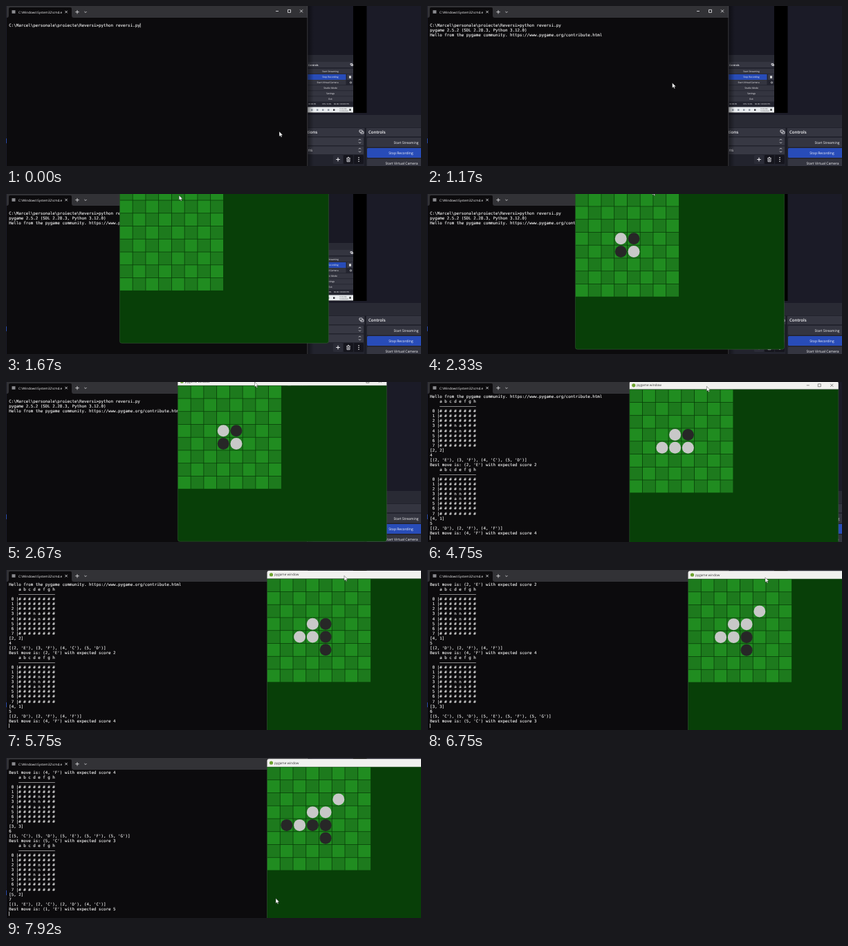
An HTML page for the animation above (8000 ms loop, 600x232 px).

```html
<!DOCTYPE html>
<html lang="en">
<head>
<meta charset="utf-8">
<title>Reversi session</title>
<style>
  html, body { margin: 0; width: 100%; height: 100%; overflow: hidden; background: #000; }
  svg { display: block; width: 600px; height: 232px; }
  text { white-space: pre; text-rendering: geometricPrecision; }
  .ui { font-family: "Open Sans", "Noto Sans", sans-serif; fill: #fafafc; }
  .mono { font-family: "DejaVu Sans Mono", monospace; font-size: 5.83px; fill: #f2f2f2; stroke: #f2f2f2; stroke-width: .12; }
  .mid { text-anchor: middle; }
  .line { fill: none; stroke: #ececf0; stroke-width: .8; }
</style>
</head>
<body>
<svg viewBox="0 0 600 232" xmlns="http://www.w3.org/2000/svg">
  <defs>
    <linearGradient id="shade">
      <stop offset="0" stop-color="#000" stop-opacity=".45"/>
      <stop offset="1" stop-color="#000" stop-opacity="0"/>
    </linearGradient>
  </defs>
  <g id="recorder"></g>
  <g id="terminal"></g>
  <g id="game"></g>
  <path id="pointer" d="M0 0V7.2L1.7 5.7L2.8 8.2L4 7.7L2.9 5.3H5.2Z" fill="#fff" stroke="#222" stroke-width=".4"/>
</svg>
<script>
const LOOP = 8000, CELL = 18.75, ROW = 7.06, ROWS = 30, CHAR = 3.51;
const el = id => document.getElementById(id);
const rect = (x, y, w, h, fill, extra = '') =>
  `<rect x="${x}" y="${y}" width="${w}" height="${h}" fill="${fill}" ${extra}/>`;
const label = (x, y, size, str, cls = '', extra = '') =>
  `<text class="ui ${cls}" x="${x}" y="${y}" font-size="${size}" ${extra}>${str}</text>`;
const stroke = (d, extra = '') => `<path class="line" d="${d}" ${extra}/>`;
const popout = (x, y, s) =>
  stroke(`M${x} ${y}h${4 * s}v${3 * s}h${-4 * s}zM${x + 2 * s} ${y + 3 * s}v${2 * s}h${4 * s}v${-3 * s}h${-2 * s}`);

function recorder() {
  // live preview of the same screen
  let s = rect(0, 0, 600, 232, '#1b1b27') + rect(0, 192, 1, 7, '#2a4cae')
    + rect(436, 0, 85.5, 155, '#000') + rect(436, 0, 66, 147, '#191924')
    + rect(436, 71, 66, 10, '#292a34')
    + rect(436, 81, 66, 8, '#343540') + label(437, 86.6, 3.6, 'Controls', '', 'font-weight="600"')
    + popout(498, 83.5, .6)
    + rect(436, 89, 66, 58, '#23242f') + rect(436, 99, 55.5, 8, '#284cb8')
    + rect(493, 99, 8.5, 8, '#3a3b48') + rect(496, 101.3, 3, 3.5, '#ddd')
    + '<circle cx="498.5" cy="111" r="1.2" fill="none" stroke="#ddd" stroke-width=".7"/>';
  ['Start Streaming', 'Stop Recording', 'Start Virtual Camera', 'Studio Mode', 'Settings', 'Exit']
    .forEach((name, i) => {
      if (i !== 1) s += rect(436, 91 + i * 8.05, i === 2 ? 55.5 : 66, 7.2, '#343540');
      s += label(i === 2 ? 465 : 469, 95.6 + i * 8.05, 3.3, name, 'mid');
    });
  s += label(437, 143.2, 2.8, '00:00:05') + label(457, 143.2, 2.8, 'CPU: 0.3%')
    + label(474, 143.2, 2.8, '60.00 / 60.00 FPS')
    + rect(436, 146.5, 66, 8, '#e9ecef');
  [441, 449, 457, 465, 473].forEach((x, i) =>
    s += rect(x, 149.5, 2.4, 2.4, i === 4 ? '#303038' : '#8a93a0'));
  s += label(482, 150.4, 2.4, '10:35 AM', '', 'style="fill:#333"')
    + label(482, 153.4, 2.4, '10/30/2024', '', 'style="fill:#333"')
    + rect(496.5, 149, 2, 3, '#333');

  // docks under the preview
  s += rect(436, 158, 164, 74, '#292a34') + rect(436, 176.5, 164, 1, '#1a1b24')
    + rect(436, 177, 83, 12, '#343540') + rect(521, 177, 79, 12, '#343540')
    + rect(436, 189, 83, 43, '#22232d') + rect(521, 189, 79, 43, '#22232d')
    + rect(518.5, 177, 2, 55, '#191a23')
    + label(430, 185.4, 6.1, 'ditions', '', 'font-weight="600"') + popout(511, 180, 1)
    + label(524, 185.4, 6.1, 'Controls', '', 'font-weight="600"')
    + rect(430, 190.5, 87, 11.5, '#373843', 'rx="1"') + rect(430, 203.5, 87, 11.5, '#373843', 'rx="1"')
    + label(436.5, 211.4, 6, 'ns');
  [196, 209].forEach(y => s += stroke(`M510 ${y - 1.5}l1.5-1.5l1.5 1.5M510 ${y + 1.5}l1.5 1.5l1.5-1.5`));
  [473, 488, 503].forEach((x, i) => s += rect(x, 216, 14, 13, i ? '#15151d' : '#2b2c37', 'rx="1.5"'));
  s += stroke('M480 219.7v5.6M477.2 222.5h5.6', 'style="stroke-width:1.1"')
    + stroke('M492.3 220.5h5.4M493 221v4.7h4v-4.7M494 219.3h2M494.3 222v2.6M495.7 222v2.6');
  [219.7, 222.5, 225.3].forEach(y => s += `<circle cx="510" cy="${y}" r=".8" fill="#eee"/>`);
  return s + rect(522, 191, 90, 13.5, '#343540', 'rx="1.5"')
    + rect(522, 206, 90, 14, '#284cb8', 'rx="1.5"')
    + rect(522, 221.5, 90, 13, '#343540', 'rx="1.5"')
    + label(578.5, 200, 5, 'Start Streaming', 'mid')
    + label(571, 215.2, 5, 'Stop Recording', 'mid')
    + label(572, 230.2, 5, 'Start Virtual Camera', 'mid');
}

function terminal() {
  let s = rect(436, 0, 9, 232, 'url(#shade)')
    + rect(1, 0, 435, 232, '#0c0b0d') + rect(1, 0, 435, 17, '#323236')
    + '<path d="M1 17Q4 17 4 14V4Q4 2 6 2H93Q95 2 95 4V14Q95 17 98 17Z" fill="#0c0b0d"/>'
    + rect(8.5, 6.2, 5, 4.6, '#8b8b8f')
    + label(18, 10.5, 4.65, 'C:\\Windows\\System32\\cmd.e', '', 'font-weight="500"')
    + stroke('M85.4 6.9l3.4 3.4m0-3.4l-3.4 3.4M103 6v5.4M100.3 8.7h5.4'
      + 'M113.4 8l1.6 1.6l1.6-1.6M390 7.5h4M407.5 5.4h4v4h-4zM425 5.4l4 4m0-4l-4 4')
    + rect(435.5, 0, .7, 232, '#4a4a50');
  for (let i = 0; i < ROWS; i++) s += `<text class="mono" x="4.2" y="${23.1 + i * ROW}"></text>`;
  return s + '<rect id="caret" width=".8" height="6.4" fill="#ddd"/>';
}

function game() {
  let s = '<path d="M0 0V-8.7Q0-11.7 3-11.7H299Q302-11.7 302-8.7V0Z" fill="#f1f1ef"/>'
    + '<circle cx="6" cy="-6" r="2.6" fill="#6da32f"/>'
    + label(10.5, -4.4, 4.7, 'pygame window', '', 'style="fill:#333"')
    + '<path d="M256-6h4M272.5-8h4v4h-4zM290.5-8l4 4m0-4l-4 4" fill="none" stroke="#444" stroke-width=".6"/>'
    + '<path d="M0 0H302V223Q302 226 299 226H3Q0 226 0 223Z" fill="#083f08" stroke="#3c5f3c" stroke-width=".5"/>';
  for (let i = 0; i < 64; i++) {
    const c = i % 8, r = i >> 3;
    s += rect(c * CELL + .4, r * CELL + .4, CELL - .8, CELL - .8, (c + r) % 2 ? '#208c20' : '#1d7a1d');
  }
  return s + '<g id="discs"></g>';
}

// boards: n or a, then row and column
const boards = [
  'n33 a34 a43 n44',
  'n24 n33 n34 a43 n44',
  'n24 n33 n34 a43 a44 a45',
  'n24 n33 n34 n43 a44 a45 n52'
];

function report(board, last, moveNo, moves, best, score) {
  const at = {};
  board.split(' ').forEach(p => at[p.slice(1)] = p[0]);
  const rows = [...Array(8).keys()].map(r =>
    ` ${r} |` + [...Array(8).keys()].map(c => at[`${r}${c}`] || '#').join(' '));
  const name = m => `(${m[0]}, '${m[1]}')`;
  return ['    a b c d e f g h', '    ' + '–'.repeat(15), ...rows, `[${last}]`, `${moveNo}`,
    `[${moves.split(' ').map(name).join(', ')}]`,
    `Best move is: ${name(best)} with expected score ${score}`];
}

const prompt = 'C:\\Marcel\\personale\\proiecte\\Reversi>python reversi.py';
const log = ['', prompt, 'pygame 2.5.2 (SDL 2.28.3, Python 3.12.0)',
  'Hello from the pygame community. https://www.pygame.org/contribute.html',
  ...report(boards[0], '2, 2', 4, '2E 3F 4C 5D', '2E', 2),
  ...report(boards[1], '4, 1', 5, '2D 2F 4F', '4F', 4),
  ...report(boards[2], '3, 3', 6, '5C 5D 5E 5F 5G', '5C', 3),
  ...report(boards[3], '5, 2', 7, '1E 2C 2D 4C', '1E', 5)];

// [time, value] steps
const printed = [[0, 2], [1080, 4], [3830, 17], [4080, 18], [4330, 31], [4580, 32],
  [6080, 45], [6500, 46], [6920, 59], [7420, 60]];
const position = [[0, ''], [1880, boards[0]], [4170, boards[1]], [5170, boards[2]],
  [6580, boards[3]], [7750, 'n24 n33 a34 n43 a44 a45 n52 a14']];
// [time, x, y] keys
const windowPath = [[1830, 164.4, -9.7], [2670, 248.3, 5.2], [3050, 276, 9.3], [3420, 292.8, 10.8],
  [5170, 292.8, 10.8], [5420, 340, 11.8], [5700, 377.5, 12.7], [6200, 377.5, 13]];
const pointerPath = [[0, 395, 182], [80, 395, 182], [420, 396, 171], [580, 396, 171], [830, 388, 150],
  [1000, 388, 150], [1400, 310, 60], [1670, 250, 2], [1830, 276, -14], [2670, 359.5, 0],
  [3050, 388, 4.8], [3420, 404.4, 6.3], [5170, 404.4, 6.3], [5420, 452, 7.2], [5700, 489, 8.2],
  [6830, 489, 11], [7400, 524, 10], [7670, 524, 10], [7920, 390, 203.5]];

const step = (steps, t) => steps.filter(s => s[0] <= t).pop()[1];
function along(path, t) {
  const i = path.findIndex(k => k[0] > t);
  if (i < 1) return (i ? path[path.length - 1] : path[0]).slice(1);
  const a = path[i - 1], b = path[i], k = (t - a[0]) / (b[0] - a[0]);
  return [a[1] + (b[1] - a[1]) * k, a[2] + (b[2] - a[2]) * k];
}
const move = (node, [x, y]) => node.setAttribute('transform', `translate(${x} ${y})`);

el('recorder').innerHTML = recorder();
el('terminal').innerHTML = terminal();
el('game').innerHTML = game();
const lines = [...document.querySelectorAll('.mono')];
const caret = el('caret');
let shownLines, shownBoard;

function showLog(n) {
  if (n === shownLines) return;
  shownLines = n;
  const top = Math.max(0, n + 1 - ROWS), view = log.slice(top, n);
  lines.forEach((node, i) => node.textContent = view[i] || '');
  const typing = n === 2;
  caret.setAttribute('x', typing ? 4.2 + prompt.length * CHAR : 4.2);
  caret.setAttribute('y', 17.8 + (typing ? 1 : n - top) * ROW);
}

function showBoard(board) {
  if (board === shownBoard) return;
  shownBoard = board;
  el('discs').innerHTML = board.split(' ').filter(Boolean).map(([side, c, r]) =>
    `<circle cx="${(+c + .5) * CELL + .2}" cy="${(+r + .5) * CELL}" r="8.5" fill="${side === 'n' ? '#c8c8c8' : '#272727'}"/>`
  ).join('');
}

function draw(t) {
  showLog(step(printed, t));
  showBoard(step(position, t));
  caret.style.display = (t < 580 || t >= 830 && t < 1080 || t >= 3830) ? '' : 'none';
  el('game').style.display = t < 1250 ? 'none' : '';
  move(el('game'), along(windowPath, t));
  move(el('pointer'), along(pointerPath, t));
}

function tick() {
  draw(performance.now() % LOOP);
  requestAnimationFrame(tick);
}
tick();
</script>
</body>
</html>
```
